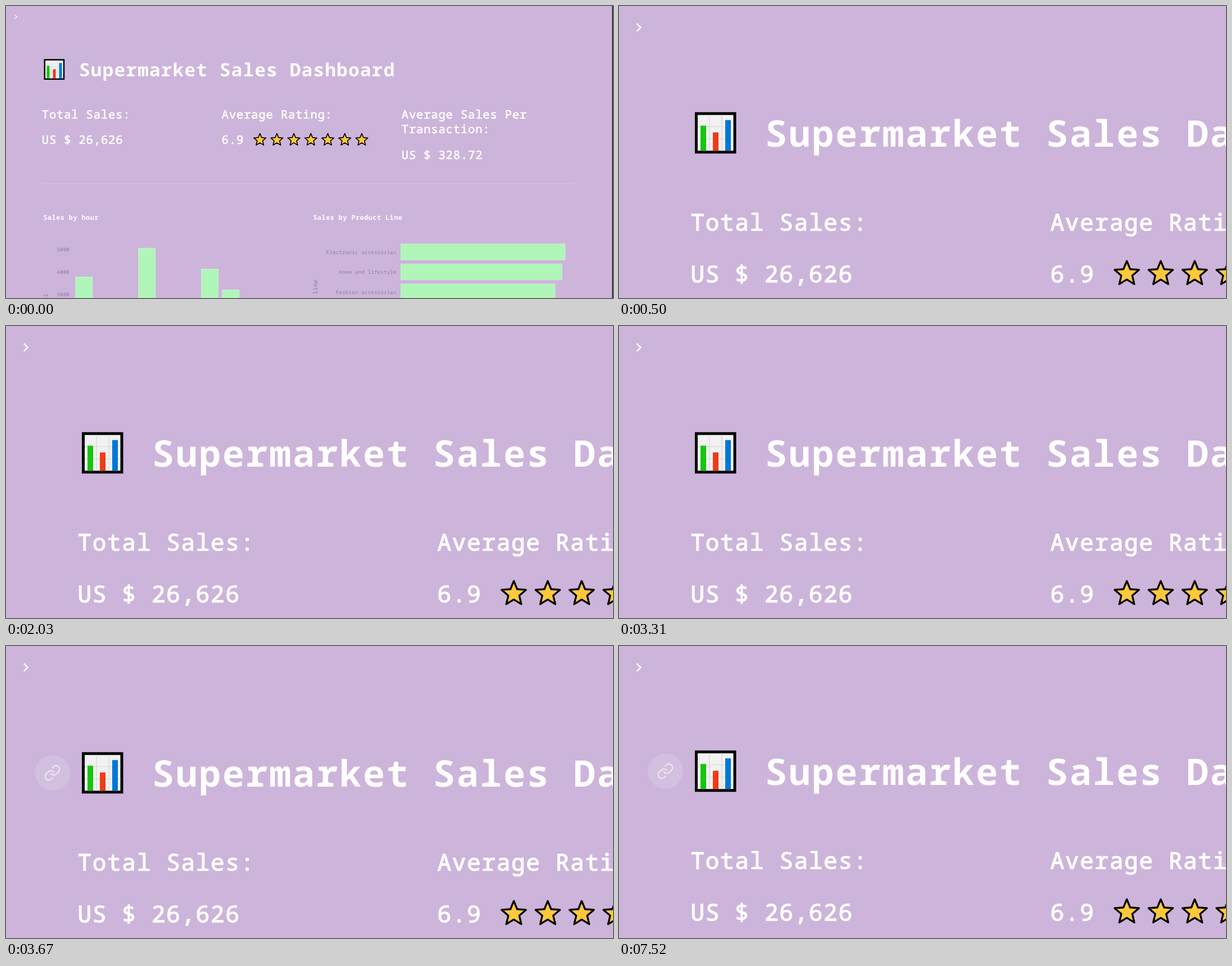
Write an HTML page that moves like this. It is 1080 px wide and 519 px high and loops after 8000 ms.

```html
<!DOCTYPE html>
<html lang="en">
<head>
<meta charset="utf-8">
<title>Sales dashboard</title>
<style>
  html, body { margin: 0; width: 100%; height: 100%; overflow: hidden; background: #cdb4db; }
  svg { display: block; width: 1080px; height: 519px; }
  text {
    font-family: "Noto Sans Mono", "DejaVu Sans Mono", monospace;
    letter-spacing: .041em;
    text-rendering: geometricPrecision;
    white-space: pre;
  }
</style>
</head>
<body>
<svg id="stage" viewBox="0 0 1080 519"></svg>
<script>
const LOOP = 8000;
const ZOOM_AT = 500, CURSOR_ON = 3050, CURSOR_OFF = 3310, LINK_AT = 3670, SCROLL_AT = 7520;
const AXIS = '#8c7ba8';
const SEMIBOLD = { stroke: '#fff', 'stroke-width': 1.3 };
const stage = document.getElementById('stage');

function add(parent, tag, attrs = {}, content) {
  const node = document.createElementNS('http://www.w3.org/2000/svg', tag);
  for (const key in attrs) node.setAttribute(key, attrs[key]);
  if (content) node.textContent = content;
  parent.appendChild(node);
  return node;
}

const group = parent => add(parent, 'g');
const rect = (parent, x, y, width, height, fill, extra) =>
  add(parent, 'rect', { x, y, width, height, fill, ...extra });
const path = (parent, d, attrs) => add(parent, 'path', { d, fill: 'none', ...attrs });

// The font size follows from the advance of one monospaced character.
const label = (parent, x, y, content, advance, weight, extra) =>
  add(parent, 'text', {
    x, y, fill: '#fff', 'font-size': advance / .641, 'font-weight': weight, ...extra
  }, content);

function starPath(cx, cy, outer, inner) {
  const points = Array.from({ length: 10 }, (_, i) => {
    const radius = i % 2 ? inner : outer;
    const angle = i * Math.PI / 5 - Math.PI / 2;
    return `${(cx + radius * Math.cos(angle)).toFixed(2)},${(cy + radius * Math.sin(angle)).toFixed(2)}`;
  });
  return `M${points.join('L')}Z`;
}

function drawChartIcon(parent) {
  const icon = add(parent, 'g', { transform: 'translate(0 -.3)' });
  rect(icon, 135, 189, 73.5, 73.5, '#000');
  rect(icon, 140, 194, 63.5, 63.5, '#f2f2f2');
  path(icon, 'M161 194V257.5M183 194V257.5M140 214.5H203.5M140 236.5H203.5',
    { stroke: '#e1e1e1', 'stroke-width': 2 });
  rect(icon, 145, 213, 10, 44.5, '#16c60c');
  rect(icon, 167, 225, 10, 32.5, '#f03a17');
  rect(icon, 189, 203, 10, 54.5, '#0078d7');
}

function drawSummary(parent) {
  drawChartIcon(parent);
  label(parent, 260, 250, 'Supermarket Sales Dashboard', 41.67, 700);
  const columns = [
    [127.5, [['Total Sales:', 399], ['US $ 26,626', 490.5]]],
    [767.5, [['Average Rating:', 399], ['6.9', 490.5]]],
    [1407.5, [['Average Sales Per', 399], ['Transaction:', 451], ['US $ 328.72', 543]]]
  ];
  for (const [x, lines] of columns)
    for (const [content, y] of lines) label(parent, x, y, content, 26.3, 400, SEMIBOLD);
  for (let i = 0; i < 7; i++)
    path(parent, starPath(903.5 + i * 60.4, 476, 22.8, 10.2), {
      fill: '#ffc83d', stroke: '#000', 'stroke-width': 3.3, 'stroke-linejoin': 'round'
    });
}

function drawCharts(parent) {
  path(parent, 'M64 315.5H1014', { stroke: '#d5c0e1' });
  path(parent, 'M65.5 316V425', { stroke: '#d1bade' });

  const bar = (x, y, width, height) =>
    rect(parent, x, y, width, height, '#aff6b8', { stroke: '#d3e8da' });
  const axis = (x, y, content) =>
    label(parent, x, y, content, 5.7, 400, { fill: AXIS, 'text-anchor': 'end' });
  const axisTitle = (x, y, content) =>
    label(parent, 0, 0, content, 6.65, 400,
      { fill: AXIS, 'text-anchor': 'end', transform: `translate(${x} ${y}) rotate(-90)` });

  label(parent, 66.5, 380, 'Sales by hour', 7.57, 700);
  [5000, 4000, 3000].forEach((value, i) => axis(113.3, 436 + i * 40.2, String(value)));
  [[0, 481.5], [3, 430.5], [6, 467.5], [7, 504.5]]
    .forEach(([slot, top]) => bar(123.8 + slot * 37.3, top, 30, 120));
  axisTitle(74, 510.5, 'Total');

  label(parent, 546.5, 380, 'Sales by Product Line', 7.57, 700);
  [['Electronic accessories', 293], ['Home and lifestyle', 287], ['Fashion accessories', 275]]
    .forEach(([name, width], i) => {
      axis(695, 440.7 + i * 35.6, name);
      bar(702.5, 422.8 + i * 35.6, width - .5, 28.4);
    });
  axisTitle(554, 486, 'Product line');
  rect(parent, 1078.5, 0, 1.5, 519, '#17121f');
}

function drawLink(parent) {
  add(parent, 'circle', { cx: 82.8, cy: 225.5, r: 31.5, fill: '#d3bfdf' });
  const icon = add(parent, 'g', { transform: 'translate(67 210) scale(1.29)' });
  const look = { stroke: '#efe6f4', 'stroke-width': 1.7, 'stroke-linecap': 'round' };
  path(icon, 'M10 13a5 5 0 0 0 7.54.54l3-3a5 5 0 0 0-7.07-7.07l-1.72 1.71', look);
  path(icon, 'M14 11a5 5 0 0 0-7.54-.54l-3 3a5 5 0 0 0 7.07 7.07l1.71-1.71', look);
}

const page = group(stage);
path(page, 'M31.7 31.2L38.6 38L31.7 44.8', { stroke: '#fff', 'stroke-width': 2.5 });
const scroller = group(page);
const link = group(scroller);
drawLink(link);
drawSummary(scroller);
const charts = group(stage);
drawCharts(charts);
const cursor = path(stage, 'M569 222.5V247L574.5 242L578.7 251L583 249L579 240.3H586.2Z', {
  fill: '#f3f0f7', stroke: '#625d7c', 'stroke-width': 1.4, 'stroke-linejoin': 'round'
});

const show = (node, visible) => node.setAttribute('visibility', visible ? 'visible' : 'hidden');

function render(t) {
  const zoomed = t >= ZOOM_AT;
  page.setAttribute('transform', `scale(${zoomed ? 1 : .5})`);
  scroller.setAttribute('transform', `translate(0 ${t >= SCROLL_AT ? -3 : 0})`);
  show(charts, !zoomed);
  show(cursor, t >= CURSOR_ON && t < CURSOR_OFF);
  show(link, t >= LINK_AT);
}

const start = performance.now();
function tick() {
  render((performance.now() - start) % LOOP);
  requestAnimationFrame(tick);
}
tick();
</script>
</body>
</html>
```
